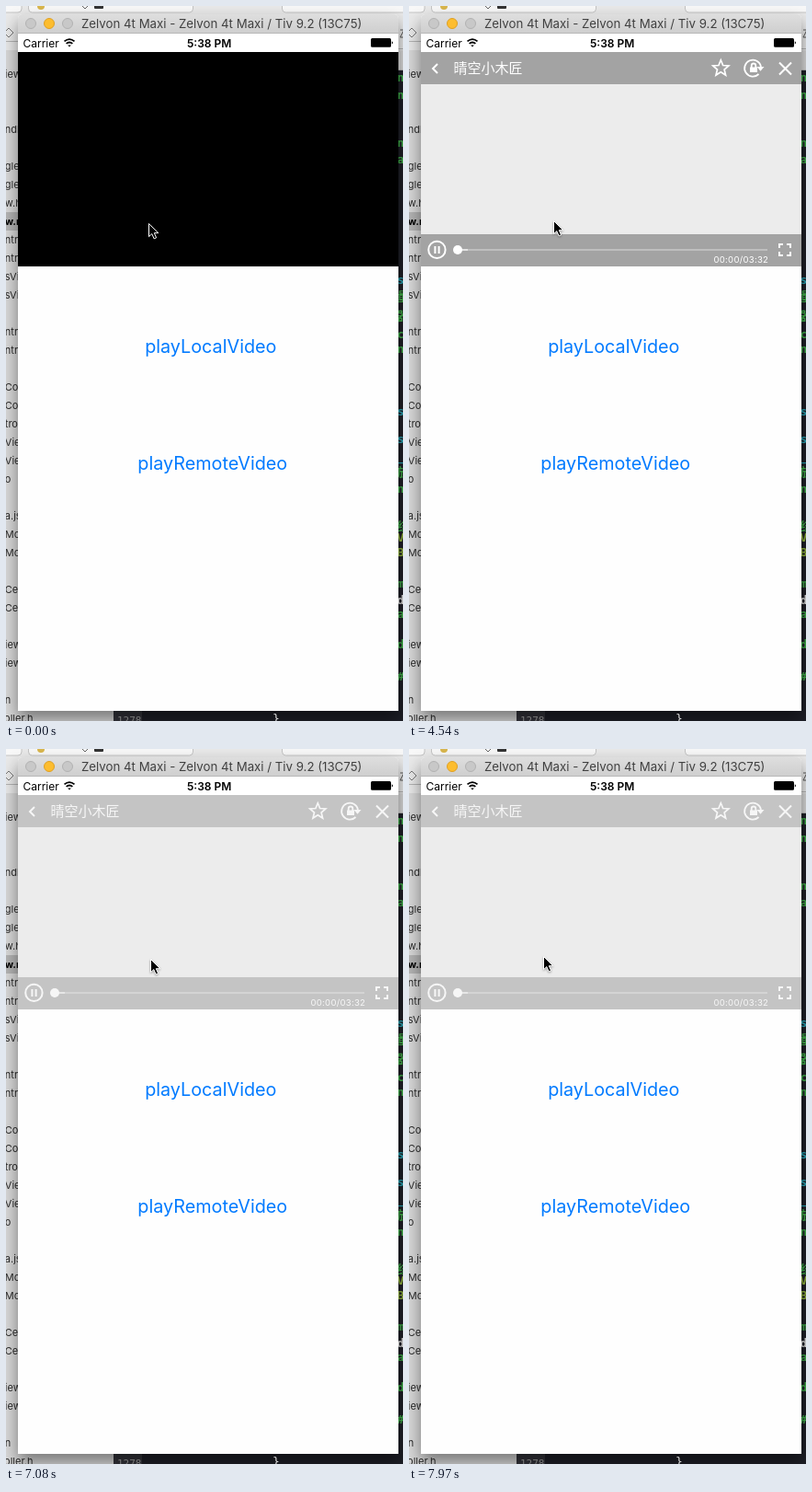
Write an HTML page that moves like this. It is 432 by 777 pixels and loops after 8000 ms.

```html
<!DOCTYPE html>
<html lang="en">
<head>
<meta charset="utf-8">
<title>Video player in a simulator</title>
<style>
  html, body { margin: 0; width: 100%; height: 100%; overflow: hidden; }
  svg { display: block; font-family: Inter, "Open Sans", sans-serif; }
  #files { font-size: 11px; fill: #2b2b2b; }
  #code { font: bold 13px "DejaVu Sans Mono", "Noto Sans CJK SC", monospace; }
  #window { filter: drop-shadow(0 9px 9px rgba(0, 0, 0, .45)); }
  #cursor { filter: drop-shadow(0 1px .8px rgba(0, 0, 0, .35)); }
  .line { fill: none; stroke: #fff; stroke-width: 2; }
</style>
</head>
<body>
<svg width="432" height="777" viewBox="0 0 432 777">
  <defs>
    <linearGradient id="bar" x2="0" y2="1">
      <stop stop-color="#dedede"/><stop offset="1" stop-color="#cecece"/>
    </linearGradient>
  </defs>

  <!-- Editor behind the window -->
  <rect width="432" height="777" fill="#d8d8d8"/>
  <rect width="432" height="48" fill="#e9e9e9"/>
  <g fill="#f8f8f8" stroke="#c4c4c4">
    <rect x="24.5" y="-12" width="179" height="19" rx="4"/>
    <rect x="300.5" y="-12" width="150" height="19" rx="4"/>
    <rect x="-8" y="-12" width="25" height="19" rx="4"/>
  </g>
  <circle cx="38" cy="0" r="4" fill="#d9b64c"/>
  <path d="M83 0l3 3l3-3" fill="none" stroke="#666"/>
  <rect x="96" y="-5" width="10" height="8" rx="1" fill="#333"/>
  <path d="M0 38.5H13M427 46.5h5M427 69.5h5" stroke="#b4b4b4"/>
  <path d="M-2 29l5-5l5 5l-5 5z" fill="none" stroke="#777"/>
  <path d="M429 26h4l-4 8h4" fill="none" stroke="#555"/>
  <rect y="224" width="14" height="20" fill="#b4b4b4"/>
  <g id="files"></g>
  <rect x="117" y="740" width="31" height="37" fill="#33343b"/>
  <path d="M148 740H426V70h6V777H148z" fill="#1d1e26"/>
  <g id="code"></g>

  <!-- Window -->
  <path id="window" d="M13 766V14q0-5 5-5H422q5 0 5 5V766z" fill="#fefefe"/>
  <text x="121" y="780" font-size="11" fill="#777" font-family="DejaVu Sans Mono, monospace">1278</text>
  <text x="290" y="779" font-size="13" fill="#ddd" font-family="DejaVu Sans Mono, monospace">}</text>
  <text x="-9.5" y="777.5" font-size="11" fill="#222">troller.h</text>
  <path d="M13 30V14q0-5 5-5H422q5 0 5 5V30z" fill="url(#bar)"/>
  <path d="M13 29.5H427" stroke="#b8b8b8"/>
  <g fill="#c8c8c8" stroke="#b2b2b2">
    <circle cx="27" cy="19" r="5.5"/>
    <circle cx="47" cy="19" r="5.5" fill="#fdbd2f" stroke="#dfa023"/>
    <circle cx="67" cy="19" r="5.5"/>
  </g>
  <text x="82" y="24" font-size="13.25" fill="#404040">Zelvon 4t Maxi - Zelvon 4t Maxi / Tiv 9.2 (13C75)</text>

  <!-- Status bar -->
  <rect x="13" y="30" width="414" height="20" fill="#fff"/>
  <text x="18.5" y="45" font-size="12">Carrier</text>
  <text x="197" y="45" font-size="12" font-weight="600">5:38 PM</text>
  <g fill="none" stroke="#000" stroke-width="1.8">
    <path d="M63.5 38.4q5.5-4.6 11 0M65.6 40.9q3.4-2.8 6.8 0"/>
    <path d="M67.2 42.4h3.6l-1.8 2.1z" fill="#000" stroke="none"/>
  </g>
  <rect x="397" y="35" width="22" height="9.7" rx="1.5"/>
  <path d="M419.8 38.2q2.4 1.7 0 3.4z"/>

  <!-- Page -->
  <rect id="video" x="13" y="50" width="414" height="233"/>
  <g font-size="19.8" fill="#007aff" text-anchor="middle">
    <text x="222.8" y="377">playLocalVideo</text>
    <text x="224.8" y="504">playRemoteVideo</text>
  </g>

  <g id="controls" fill="#fff">
    <path d="M13 50H427V85H13zM13 248H427V283H13z" fill="#000" fill-opacity=".31"/>
    <path class="line" d="M31 63l-5 5l5 5M403 61.5l13 13m0-13l-13 13"/>
    <text x="48.5" y="73.3" font-size="15" font-family="Noto Sans CJK SC, Noto Sans CJK, sans-serif" lang="zh">晴空小木匠</text>
    <path id="star" class="line" style="stroke-width:1.7"/>
    <path class="line" d="M380.5 74A9 9 0 1 1 383 66M372.7 67v-2.2a2.3 2.3 0 0 1 4.6 0V67" style="stroke-width:1.8"/>
    <path d="M371 66.5h8v5.6h-8zM378.5 66h8l-4 4.8z"/>
    <circle class="line" cx="30.4" cy="264.9" r="9.2"/>
    <path d="M27.4 261h2v8h-2zM31.6 261h2v8h-2z"/>
    <path d="M53 264H390v2H53z" fill-opacity=".3"/>
    <path d="M53 264H64v2H53z" fill-opacity=".55"/>
    <circle cx="53" cy="265" r="5"/>
    <text x="331.5" y="279.2" font-size="9.6" letter-spacing=".25">00:00/03:32</text>
    <path class="line" d="M403 263v-4h4M411 259h4v4M415 267v4h-4M407 271h-4v-4"/>
  </g>

  <path id="cursor" d="M.5.5V14.7L3.8 11.6L6.1 16.9L8.6 15.8L6.3 10.7H10.8z" stroke="#fff"/>
</svg>
<script>
  const $ = id => document.getElementById(id);

  function addText(parent, x, y, text, attrs = {}) {
    const node = document.createElementNS("http://www.w3.org/2000/svg", "text");
    Object.entries({ x, y, ...attrs }).forEach(([key, value]) => node.setAttribute(key, value));
    node.textContent = text;
    parent.append(node);
  }

  // One entry per 20 px row of the file list
  const files = "iew,,,ndle,,gle,gle,w.h,w.m,ntro,ntro,sVi,sVi,,ntr,ntr,,Co,Co,tro,Vie,Vie,o,,a.js,Mod,Mod,,Cel,Cel,,iew,iew,,n";
  files.split(",").forEach((name, i) => addText($("files"), -1.2, 78 + i * 20, name,
    name === "w.m" ? { "font-weight": 700, fill: "#000" } : {}));

  const colors = { g: "#3fae49", c: "#27a3b4", y: "#8fb13c", w: "#ddd" };
  const code = "82gn 101gn 153gn 171ga 302cs 320g量 341g器 361gc 377gn 445cs 475cs 494c_ 511g放 529gn 570g结 582yV 598yB 632gm 650wd 665ga 698gd 733g#";
  code.split(" ").forEach(token => {
    const [, y, color, char] = token.match(/(\d+)(.)(.)/);
    addText($("code"), 425.5, y, char, { fill: colors[color] });
  });

  const starPoints = Array.from({ length: 10 }, (_, i) => {
    const radius = i % 2 ? 4 : 9, angle = i * Math.PI / 5;
    return [339.3 + radius * Math.sin(angle), 67.8 - radius * Math.cos(angle)];
  });
  $("star").setAttribute("d", "M" + starPoints.join("L") + "z");

  // Each step holds until the next: [start ms, value...]
  const cursorSteps = [
    [0, 155, 236], [500, 156, 235], [650, 157, 234], [4540, 157, 233], [4690, 164, 234], [5280, 157, 230],
    [5580, 157, 229], [5730, 157, 228], [7380, 149, 226], [7530, 148, 226], [7970, 146, 225]
  ];
  const opacitySteps = [[0, 0], [1840, .55], [1990, 1], [7080, .55], [7230, 0], [7970, .55]];
  const stepAt = (steps, time) => steps.findLast(step => step[0] <= time);

  const start = performance.now();
  function draw() {
    const time = Math.max(0, performance.now() - start) % 8000;
    const [, x, y] = stepAt(cursorSteps, time);
    $("cursor").setAttribute("transform", `translate(${x} ${y})`);
    $("controls").setAttribute("opacity", stepAt(opacitySteps, time)[1]);
    $("video").setAttribute("fill", time < 4540 ? "#000" : "#ececec");
    requestAnimationFrame(draw);
  }
  draw();
</script>
</body>
</html>
```
